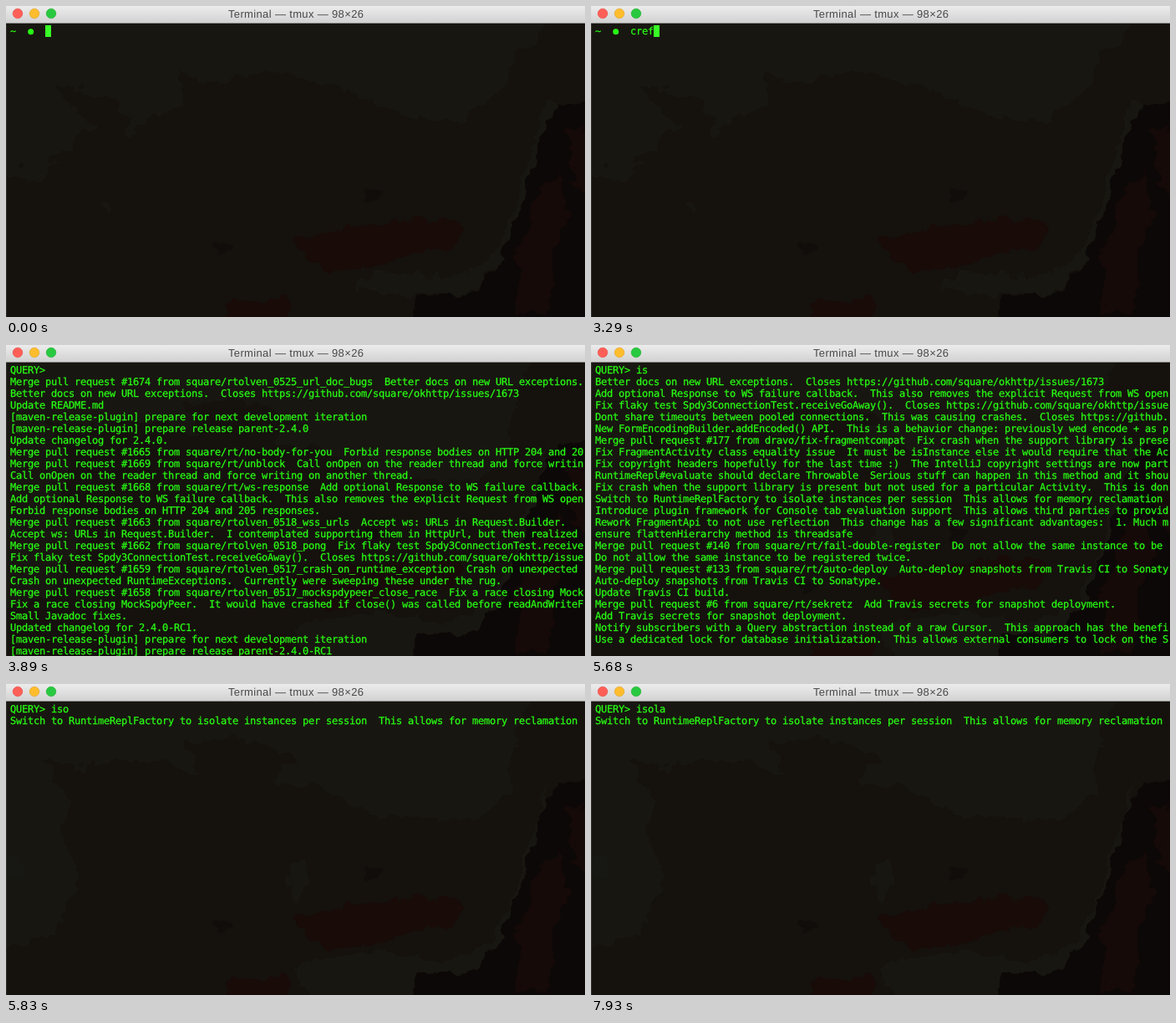
Write an HTML page that moves like this. It is 693 px wide and 372 px high and loops after 8 s.

```html
<!DOCTYPE html>
<html lang="en">
<head>
<meta charset="utf-8">
<title>Terminal</title>
<style>
  html, body { margin: 0; width: 100%; height: 100%; overflow: hidden; background: #15110d; }
  svg { display: block; width: 693px; height: 372px; }
  text { white-space: pre; text-rendering: geometricPrecision; }
  .title { font: 13px "Liberation Sans", Arial, sans-serif; letter-spacing: .35px; fill: #484848; }
  .mono { font: 12px "DejaVu Sans Mono", Menlo, monospace; letter-spacing: -.224px;
          fill: #28fe14; stroke: #28fe14; stroke-width: .25px; }
</style>
</head>
<body>
<svg viewBox="0 0 693 372" xmlns="http://www.w3.org/2000/svg">
  <defs>
    <linearGradient id="bar" x1="0" y1="0" x2="0" y2="1">
      <stop offset="0" stop-color="#ececec"/>
      <stop offset="1" stop-color="#d2d2d2"/>
    </linearGradient>
    <filter id="rough" filterUnits="userSpaceOnUse" x="-20" y="0" width="733" height="392" color-interpolation-filters="sRGB">
      <feTurbulence type="fractalNoise" baseFrequency=".05" numOctaves="3" seed="4"/>
      <feDisplacementMap in="SourceGraphic" scale="22" xChannelSelector="R" yChannelSelector="G"/>
    </filter>
  </defs>

  <rect width="693" height="372" fill="#15110d"/>
  <g filter="url(#rough)">
    <g id="shellBack" fill="#181610">
      <path d="M-20 0H655L645 30 612 55 600 90 575 115 545 138 500 136 450 122 405 98 365 92 330 78 285 84 255 92 212 82 208 122 175 130 150 155 110 142 85 160 60 190 40 212 0 205 -20 200Z"/>
      <path d="M645 115L630 165 606 245 590 290 550 322 440 318 430 338 480 348 555 345 600 290 632 200 662 118Z"/>
      <g fill="#15110d">
        <path d="M58 95L95 100 150 130 145 155 100 140 75 115Z"/>
        <ellipse cx="70" cy="182" rx="14" ry="6"/>
        <ellipse cx="18" cy="187" rx="5" ry="4"/>
      </g>
      <ellipse cx="122" cy="240" rx="5" ry="4"/>
      <ellipse cx="430" cy="336" rx="14" ry="6"/>
    </g>
    <g id="queryBack" fill="#181610">
      <path d="M-20 0H640L610 60 600 130 560 165 440 155 380 125 250 110 170 90 100 95 60 170 90 230 60 300 -20 320Z"/>
      <path d="M650 115L625 190 606 260 575 310 540 330 440 320 350 335 360 380 490 380 490 352 560 345 620 270 645 160Z"/>
      <g fill="#15110d">
        <path d="M50 90L110 105 125 140 85 150 60 120Z"/>
        <path d="M215 70L300 65 345 90 300 130 240 125Z"/>
        <ellipse cx="585" cy="175" rx="25" ry="18"/>
      </g>
      <ellipse cx="350" cy="235" rx="12" ry="25"/>
      <ellipse cx="10" cy="222" rx="12" ry="14" fill="#171713"/>
    </g>
    <path fill="#0c0807" d="M715 112L662 118 636 160 628 205 610 258 590 305 558 345 492 350 482 395H715Z"/>
    <g fill="#180b08">
      <path d="M343 284L380 268 440 262 500 254 540 256 548 275 530 290 470 300 430 314 380 314 358 302Z"/>
      <path d="M245 380L270 358 310 348 345 352 335 380Z"/>
    </g>
    <g fill="#150a08">
      <path d="M640 215L665 200 672 260 655 300 650 360 615 375 612 300Z"/>
      <path d="M672 150L693 140 700 230 682 215Z"/>
    </g>
    <g fill="#110d0a">
      <ellipse cx="441" cy="226" rx="11" ry="6"/>
      <ellipse cx="262" cy="291" rx="10" ry="5"/>
    </g>
  </g>
  <rect y="20" width="1" height="352" fill="#302f2b"/>

  <rect width="693" height="20" fill="url(#bar)"/>
  <rect y="20" width="693" height="1" fill="#8d8c8a"/>
  <g stroke-width=".6">
    <circle cx="14" cy="9" r="5.8" fill="#ff5f57" stroke="#e2463f"/>
    <circle cx="34" cy="9" r="5.8" fill="#ffbd2e" stroke="#dfa023"/>
    <circle cx="54" cy="9" r="5.8" fill="#28c940" stroke="#1dad2b"/>
  </g>
  <text class="title" x="266" y="14">Terminal — tmux — 98×26</text>

  <g id="shell">
    <text class="mono" x="5" y="34">~</text>
    <circle cx="29.7" cy="30.8" r="3.5" fill="#28fe14"/>
    <text class="mono" id="command" x="47" y="34"></text>
    <rect id="cursor" y="23" width="7" height="14" fill="#38fe27"/>
  </g>
  <g id="query"></g>
</svg>
<script>
const LOOP = 8000, COLS = 98, ROWS = 24, CELL = 7, LINE = 14;
const QUERY_START = 3890;

const pull = (id, branch, title) => `Merge pull request #${id} from ${branch}  ${title}`;
const release = version => [
  "[maven-release-plugin] prepare for next development iteration",
  `[maven-release-plugin] prepare release parent-${version}`
];

const commits = [
  pull(1674, "square/rtolven_0525_url_doc_bugs", "Better docs on new URL exceptions."),
  "Better docs on new URL exceptions.  Closes https://github.com/square/okhttp/issues/1673",
  "Update README.md",
  ...release("2.4.0"),
  "Update changelog for 2.4.0.",
  pull(1665, "square/rt/no-body-for-you", "Forbid response bodies on HTTP 204 and 205"),
  pull(1669, "square/rt/unblock", "Call onOpen on the reader thread and force writing"),
  "Call onOpen on the reader thread and force writing on another thread.",
  pull(1668, "square/rt/ws-response", "Add optional Response to WS failure callback."),
  "Add optional Response to WS failure callback.  This also removes the explicit Request from WS open",
  "Forbid response bodies on HTTP 204 and 205 responses.",
  pull(1663, "square/rtolven_0518_wss_urls", "Accept ws: URLs in Request.Builder."),
  "Accept ws: URLs in Request.Builder.  I contemplated supporting them in HttpUrl, but then realized",
  pull(1662, "square/rtolven_0518_pong", "Fix flaky test Spdy3ConnectionTest.receiveGoAway"),
  "Fix flaky test Spdy3ConnectionTest.receiveGoAway().  Closes https://github.com/square/okhttp/issues",
  pull(1659, "square/rtolven_0517_crash_on_runtime_exception", "Crash on unexpected"),
  "Crash on unexpected RuntimeExceptions.  Currently were sweeping these under the rug.",
  pull(1658, "square/rtolven_0517_mockspdypeer_close_race", "Fix a race closing MockSpdyPeer"),
  "Fix a race closing MockSpdyPeer.  It would have crashed if close() was called before readAndWriteF",
  "Small Javadoc fixes.",
  "Updated changelog for 2.4.0-RC1.",
  ...release("2.4.0-RC1"),
  pull(1654, "square/rtolven_0516_dont_share_timeouts", "Dont share timeouts between"),
  "Dont share timeouts between pooled connections.  This was causing crashes.  Closes https://github.com",
  pull(1655, "square/rtolven_0516_okio_14", "Use Okio 1.4.0 final."),
  "New FormEncodingBuilder.addEncoded() API.  This is a behavior change: previously wed encode + as p",
  pull(177, "dravo/fix-fragmentcompat", "Fix crash when the support library is present"),
  "Fix FragmentActivity class equality issue  It must be isInstance else it would require that the Ac",
  "Fix copyright headers hopefully for the last time :)  The IntelliJ copyright settings are now part of this",
  "RuntimeRepl#evaluate should declare Throwable  Serious stuff can happen in this method and it shou",
  "Fix crash when the support library is present but not used for a particular Activity.  This is done",
  "Switch to RuntimeReplFactory to isolate instances per session  This allows for memory reclamation",
  "Introduce plugin framework for Console tab evaluation support  This allows third parties to provide",
  "Rework FragmentApi to not use reflection  This change has a few significant advantages:  1. Much m",
  "ensure flattenHierarchy method is threadsafe",
  pull(140, "square/rt/fail-double-register", "Do not allow the same instance to be"),
  "Do not allow the same instance to be registered twice.",
  pull(133, "square/rt/auto-deploy", "Auto-deploy snapshots from Travis CI to Sonatype"),
  "Auto-deploy snapshots from Travis CI to Sonatype.",
  "Update Travis CI build.",
  pull(6, "square/rt/sekretz", "Add Travis secrets for snapshot deployment."),
  "Add Travis secrets for snapshot deployment.",
  "Notify subscribers with a Query abstraction instead of a raw Cursor.  This approach has the benefit",
  "Use a dedicated lock for database initialization.  This allows external consumers to lock on the S"
];

// [start ms, value]
const typed = [[0, ""], [2390, "c"], [2840, "cre"], [3290, "cref"]];
const blink = [[0, true], [150, false], [600, true], [1040, false], [1640, true], [2090, false], [2390, true]];
const searched = [[QUERY_START, ""], [5240, "i"], [5680, "is"], [5830, "iso"], [6280, "isol"],
  [6430, "isola"], [6730, "isolate"], [7780, "isolat"], [7930, "isola"]];

const $ = id => document.getElementById(id);
const at = (steps, t) => steps.filter(([start]) => start <= t).pop()[1];
const show = (id, on) => $(id).setAttribute("display", on ? "inline" : "none");

const rows = Array.from({ length: ROWS + 1 }, (_, i) => {
  const row = document.createElementNS("http://www.w3.org/2000/svg", "text");
  row.setAttribute("class", "mono");
  row.setAttribute("x", 5);
  row.setAttribute("y", 34 + i * LINE);
  return $("query").appendChild(row);
});

let lastQuery = null;
function search(query) {
  if (query === lastQuery) return;
  lastQuery = query;
  const found = commits.filter(c => c.toLowerCase().includes(query));
  const lines = ["QUERY> " + query, ...found];
  rows.forEach((row, i) => row.textContent = (lines[i] || "").slice(0, COLS));
}

function draw(t) {
  const querying = t >= QUERY_START;
  show("shell", !querying);
  show("shellBack", !querying);
  show("query", querying);
  show("queryBack", querying);
  if (querying) return search(at(searched, t));
  const command = at(typed, t);
  $("command").textContent = command;
  $("cursor").setAttribute("x", 47 + command.length * CELL);
  show("cursor", at(blink, t));
}

const began = performance.now();
function tick() {
  draw((performance.now() - began) % LOOP);
  requestAnimationFrame(tick);
}
tick();
</script>
</body>
</html>
```
